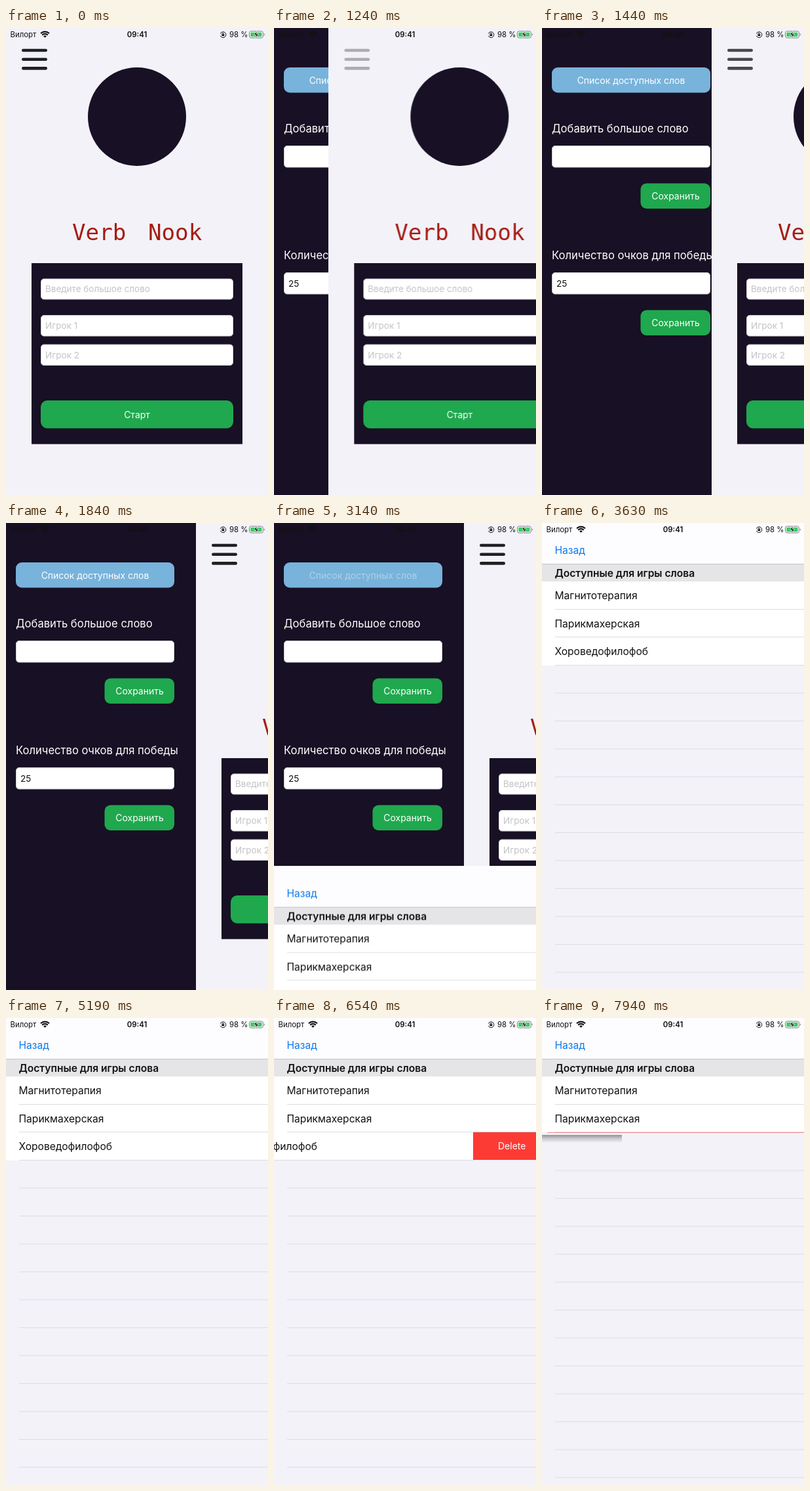
Recreate the animation shown at these times as an HTML page. Size 400x711 px, loop 7990 ms.

```html
<!DOCTYPE html>
<html lang="ru">
<head>
<meta charset="utf-8">
<title>Игра в слова</title>
<style>
  html, body { margin: 0; width: 100%; height: 100%; overflow: hidden; background: #f3f2f9; }
  svg { display: block; width: 400px; height: 711px; font-family: Inter, "Noto Sans", sans-serif; }
  .dark { fill: #181024; }
  .page { fill: #f3f2f9; }
  .green { fill: #1fa84e; }
  .field { fill: #fff; stroke: #cfcdd4; }
  .hint { fill: #c3c3c7; font-size: 13.5px; }
  .label { fill: #fff; font-size: 16.6px; }
  .button { fill: #fff; font-size: 14px; text-anchor: middle; }
  .cell { fill: #111; font-size: 15.6px; }
  .line { fill: none; stroke: #dddce2; }
  .title { fill: #a61c13; font: 34.2px "DejaVu Sans Mono", monospace; word-spacing: 13px; }
  .status { font-size: 11.4px; fill: #111; }

  .front, .burger, .press, .sheet, .swipe, .delete, .caption, .lines, .shade {
    animation: 7990ms linear infinite;
  }
  .front { animation-name: front; }
  .burger { animation-name: burger; fill: none; stroke: #1f2024; stroke-width: 4.6; stroke-linecap: round; }
  .press { animation-name: press; }
  .sheet { animation-name: sheet; }
  .swipe { animation-name: swipe; }
  .delete { animation-name: delete; }
  .caption { animation-name: caption; }
  .lines { animation-name: lines; }
  .shade { animation-name: shade; }

  /* side menu */
  @keyframes front {
    0%, 13.21% { transform: none; animation-timing-function: ease-in-out; }
    19.46%, 100% { transform: translateX(290px); }
  }
  @keyframes burger {
    0%, 11.76% { stroke: #1f2024; }
    11.77%, 16.145% { stroke: #adadb0; }
    18.773%, 100% { stroke: #1f2024; }
  }
  /* word list slides up */
  @keyframes press {
    0%, 36.92% { opacity: 1; }
    36.93%, 39.55% { opacity: .4; }
    41.8%, 100% { opacity: 1; }
  }
  @keyframes sheet {
    0%, 38.53% { transform: translateY(711px); animation-timing-function: cubic-bezier(.38, .7, .125, 1); }
    44.79%, 100% { transform: none; }
  }
  /* swipe, then delete */
  @keyframes swipe {
    0%, 78.849% { transform: none; animation-timing-function: ease-out; }
    81.852% { transform: translateX(-96px); animation-timing-function: ease-in-out; }
    85.106%, 91.99% { transform: translateX(-74px); animation-timing-function: ease-in-out; }
    95.745%, 100% { transform: translateX(-400px); }
  }
  @keyframes caption {
    0%, 91.99% { transform: none; animation-timing-function: ease-in-out; }
    95.745%, 100% { transform: translateX(-326px); }
  }
  @keyframes delete {
    0%, 97.121% { transform: none; opacity: 1; }
    99.249%, 100% { transform: translate(8px, -41px); opacity: .55; }
  }
  @keyframes lines {
    0%, 97.121% { transform: none; }
    100% { transform: translateY(-34.1px); }
  }
  @keyframes shade {
    0%, 97.121% { transform: none; }
    99.374% { transform: translateX(-276px); }
    100% { transform: translateX(-352px); }
  }
</style>
</head>
<body>
<svg viewBox="0 0 400 711">
  <defs>
    <linearGradient id="fall" x2="0" y2="1">
      <stop stop-color="#929195"/>
      <stop offset=".45" stop-color="#c9c8cd"/>
      <stop offset="1" stop-color="#f3f2f9"/>
    </linearGradient>
  </defs>

  <!-- menu -->
  <rect class="dark" width="400" height="711"/>
  <rect x="15" y="60" width="242" height="38.5" rx="9" fill="#78b3db"/>
  <text class="button press" x="136" y="84.5">Список доступных слов</text>
  <text class="label" x="15" y="158.5">Добавить большое слово</text>
  <rect class="field" x="15.5" y="179.5" width="241" height="32.5" rx="4.5"/>
  <rect class="green" x="150.5" y="236.5" width="106.5" height="38.5" rx="9"/>
  <text class="button" x="204" y="261">Сохранить</text>
  <text class="label" x="15" y="351.5">Количество очков для победы</text>
  <rect class="field" x="15.5" y="372.5" width="241" height="32.5" rx="4.5"/>
  <text x="22" y="394" font-size="13.6" fill="#111">25</text>
  <rect class="green" x="150.5" y="429.5" width="106.5" height="38.5" rx="9"/>
  <text class="button" x="204" y="454">Сохранить</text>

  <!-- start screen -->
  <g class="front">
    <rect class="page" width="400" height="711"/>
    <path class="burger" d="M26.3 34h34.4M26.3 47.7h34.4M26.3 61.4h34.4"/>
    <circle class="dark" cx="200" cy="135" r="75"/>
    <text class="title" x="101" y="323">Verb Nook</text>
    <rect class="dark" x="39" y="358" width="322" height="275.5"/>
    <rect class="field" x="53.5" y="382" width="293" height="31" rx="4.5"/>
    <text class="hint" x="60" y="402.3">Введите большое слово</text>
    <rect class="field" x="53.5" y="437.5" width="293" height="31.5" rx="4.5"/>
    <text class="hint" x="60" y="458">Игрок 1</text>
    <rect class="field" x="53.5" y="482" width="293" height="31.5" rx="4.5"/>
    <text class="hint" x="60" y="502.5">Игрок 2</text>
    <rect class="green" x="53" y="567" width="294" height="42.5" rx="10"/>
    <text class="button" x="200" y="593.5">Старт</text>
  </g>

  <!-- word list -->
  <g class="sheet">
    <rect class="page" width="400" height="711"/>
    <path class="line lines" id="empty"/>
    <rect class="shade" y="178" width="400" height="12" fill="url(#fall)"/>
    <g class="delete">
      <rect y="174" width="400" height="42" fill="#fd3b35"/>
      <text class="caption" x="342" y="200.3" font-size="14" fill="#fff">Delete</text>
    </g>
    <g class="swipe">
      <rect y="174" width="400" height="43" fill="#fff"/>
      <text class="cell" x="19.5" y="201">Хороведофилофоб</text>
      <path class="line" d="M20 216.5h380"/>
    </g>
    <rect y="89" width="400" height="85" fill="#fff"/>
    <text class="cell" x="19.5" y="116">Магнитотерапия</text>
    <text class="cell" x="19.5" y="158.5">Парикмахерская</text>
    <path class="line" d="M20 131.5h380M20 173.5h380"/>
    <rect width="400" height="62" fill="#fdfcfe"/>
    <text x="19.5" y="46.5" font-size="15.6" fill="#0a7af0">Назад</text>
    <rect y="62" width="400" height="27" fill="#e5e4e6"/>
    <path d="M0 62.5h400" stroke="#c4c3c7"/>
    <text class="cell" x="19.5" y="81.7" font-weight="600">Доступные для игры слова</text>
  </g>

  <!-- status bar -->
  <g class="status">
    <text x="6.5" y="14">Вилорт</text>
    <path d="M53 8.2a9.3 9.3 0 0 1 13 0M55.2 10.7a6 6 0 0 1 8.6 0" fill="none" stroke="#111" stroke-width="2.2"/>
    <path d="M59.5 14.8l-2.3-2.4a3.4 3.4 0 0 1 4.6 0z"/>
    <text x="200" y="14" text-anchor="middle" font-weight="600">09:41</text>
    <path d="M327.3 8.6a4.4 4.4 0 1 1 0 3.2M330 9.8v-.8a1.3 1.3 0 0 1 2.6 0v.8" fill="none" stroke="#111"/>
    <rect x="329.4" y="9.6" width="3.8" height="2.6"/>
    <text x="341" y="14">98 %</text>
    <rect x="371.5" y="5" width="21" height="10" rx="2.8" fill="#fff" stroke="#77777c"/>
    <rect x="373.2" y="6.7" width="17.4" height="6.6" rx="1.4" fill="#39c964"/>
    <path d="M394 8.3v3.4a1.9 1.9 0 0 0 0-3.4z" fill="#77777c"/>
    <path d="M383.3 4.8l-5 5.8h3.3l-1 4.6 5.2-6h-3.4z" stroke="#fff" stroke-width=".7"/>
  </g>
</svg>
<script>
  const rows = Array.from({ length: 12 }, (_, i) => `M20 ${259 + 42.5 * i}h380`);
  document.getElementById('empty').setAttribute('d', rows.join(''));
</script>
</body>
</html>
```
